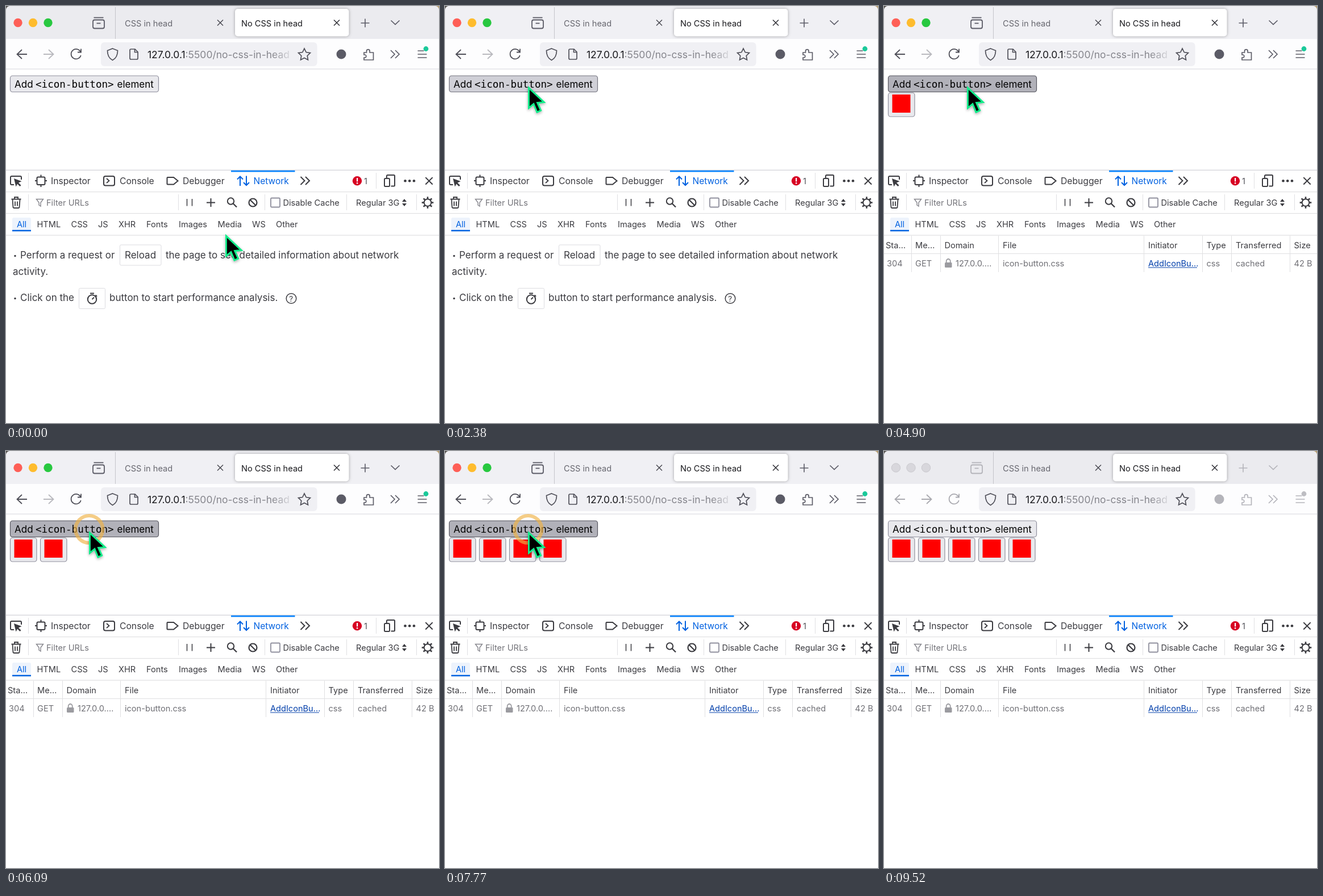
Recreate the animation shown at these times as an HTML page with a canvas. Size 762 by 735 pixels, loop 9.59 s.

```html
<!DOCTYPE html>
<html lang="en">
<head>
<meta charset="utf-8">
<title>Icon button demo</title>
<style>
html, body { margin: 0; width: 100%; height: 100%; overflow: hidden; background: #fff; }
canvas { display: block; width: 762px; height: 735px; }
</style>
</head>
<body>
<canvas id="stage" width="762" height="735"></canvas>
<script>
const ctx = document.getElementById('stage').getContext('2d');
const LOOP = 9590, STEP = 70;
const SANS = 'Inter, "Open Sans", sans-serif';
const MONO = '"DejaVu Sans Mono", monospace';
const INK = '#3b3b40', BLUE = '#0061e0', RULE = '#e0e0e2';
const CLICKS = [3010, 4900, 6020, 6790, 7700];
const SHRINK = 4130, LEAVE = 8190, BLUR = 9520;

function text(s, x, y, size = 14.6, color = INK, font = SANS) {
  ctx.font = `${size}px ${font}`;
  ctx.fillStyle = color;
  ctx.fillText(s, x, y);
}
function line(d, color = INK, width = 2) {
  ctx.strokeStyle = color;
  ctx.lineWidth = width;
  ctx.stroke(new Path2D(d));
}
function shape(d, color) {
  ctx.fillStyle = color;
  ctx.fill(new Path2D(d));
}
function rect(x, y, w, h, color) {
  ctx.fillStyle = color;
  ctx.fillRect(x, y, w, h);
}
function box(x, y, w, h, r, fill, stroke, width = 1) {
  ctx.beginPath();
  ctx.roundRect(x, y, w, h, r);
  if (fill) { ctx.fillStyle = fill; ctx.fill(); }
  if (stroke) { ctx.strokeStyle = stroke; ctx.lineWidth = width; ctx.stroke(); }
}
function disc(x, y, r, fill, stroke, width = 1) {
  ctx.beginPath();
  ctx.arc(x, y, r, 0, Math.PI * 2);
  if (fill) { ctx.fillStyle = fill; ctx.fill(); }
  if (stroke) { ctx.strokeStyle = stroke; ctx.lineWidth = width; ctx.stroke(); }
}
function cross(x, y, r, color, width) {
  line(`M${x - r} ${y - r}l${2 * r} ${2 * r}M${x + r} ${y - r}l${-2 * r} ${2 * r}`, color, width);
}
function plus(x, y, r, color, width) {
  line(`M${x - r} ${y}h${2 * r}M${x} ${y - r}v${2 * r}`, color, width);
}
function spokes(x, y, n, r1, r2, color, width) {
  for (let i = 0; i < n; i++) {
    const a = i * Math.PI * 2 / n, c = Math.cos(a), s = Math.sin(a);
    line(`M${x + r1 * c} ${y + r1 * s}L${x + r2 * c} ${y + r2 * s}`, color, width);
  }
}
function star(x, y, r) {
  let d = '';
  for (let i = 0; i < 10; i++) {
    const a = (i / 5 - .5) * Math.PI, k = i % 2 ? r * .5 : r;
    d += `${i ? 'L' : 'M'}${x + k * Math.cos(a)} ${y + k * Math.sin(a)}`;
  }
  line(d + 'Z', '#4f4f58', 1.7);
}

function browser(t) {
  const idle = t >= BLUR;
  const k = idle ? 0 : Math.min(1, t / 280);
  const icon = idle ? '#b4b4ba' : '#5b5b66';
  rect(0, 0, 762, 58, `rgb(${235 + 5 * k},${235 + 5 * k},${239 + 5 * k})`);
  shape('M0 0h6q-5 1-6 6z', '#55534f');
  shape('M762 0h-6q5 1 6 6z', '#b79f72');
  ['#fe5f57', '#febc2e', '#28c840'].forEach((c, i) =>
    disc(21 + 26.5 * i, 29.5, 7.7, idle ? '#d8d7dc' : c, idle ? '#c9c8cd' : null));
  line('M154.5 20.5h17', icon, 1.8);
  box(153, 24.5, 20, 15, 3, null, icon, 1.8);
  line('M159.5 30.5h7', icon, 1.8);
  rect(192, 2, 1, 56, '#c4c4ca');
  text('CSS in head', 209, 35.5, 14.6, '#66666e');
  cross(377, 29.5, 5, '#4a4a52', 1.5);

  ctx.save();
  ctx.shadowColor = 'rgba(0,0,0,.35)';
  ctx.shadowBlur = 5;
  box(403, 5, 200.5, 48.5, 5, '#fff');
  ctx.restore();
  text('No CSS in head', 414, 35.5, 14.6, '#18181c');
  cross(582, 29.5, 5, '#303036', 1.5);
  plus(632, 30, 7.5, icon, 1.6);
  line('M677.5 25.5l7.5 7 7.5-7', icon, 1.7);

  rect(0, 58, 762, 53, '#fdfdfe');
  rect(0, 110.5, 762, 1.2, '#dedee3');
  const dark = idle ? '#aaaab0' : '#4f4f58';
  line('M37 85H20M28 77l-8.5 8 8.5 8', dark, 1.8);
  line('M66 85h17M75 77l8.5 8-8.5 8', idle ? '#aaaab0' : '#b9b9be', 1.8);
  line('M131.2 81a8.7 8.7 0 1 0 .5 6M132 75.5v6h-6', dark, 1.8);
  box(167, 64, 380.5, 42, 6, '#f0f0f4');
  line('M187.5 75l9 3.5c0 9-3 14-9 17c-6-3-9-8-9-17z', '#4f4f58', 1.7);
  line('M220 76h7l5 5v11q0 2-2 2h-10q-2 0-2-2v-14q0-2 2-2zM226.5 76.5v5h5', '#4f4f58', 1.7);

  const fade = ctx.createLinearGradient(468, 0, 508, 0);
  fade.addColorStop(0, '#85858c');
  fade.addColorStop(1, 'rgba(133,133,140,0)');
  text('127.0.0.1', 249, 92, 17.5, '#18181c');
  const host = ctx.measureText('127.0.0.1').width;
  text(':5500/no-css-in-head', 249 + host, 92, 17.5, fade);
  star(525, 86, 11);

  disc(590, 85, 8.5, icon);
  line('M630 82h4.5v-2.5a2.8 2.8 0 0 1 5.6 0v2.5h6.4v13h-16.5v-4h2a2.6 2.6 0 0 0 0-5h-2z', icon, 1.7);
  line('M677 78l7 7-7 7M685 78l7 7-7 7', icon, 1.7);
  line('M724.5 79h11M724.5 85h16M724.5 91h16', icon, 1.6);
  disc(739, 75.5, 4.4, idle ? '#bdbdc2' : '#1bc99a');
}

function tools() {
  rect(0, 289, 762, 446, '#fff');
  rect(0, 288.7, 762, 1.3, '#d5d5d9');
  for (const y of [327, 365, 403.5]) rect(0, y, 762, 1.2, RULE);
  for (const [x, y] of [[39, 294], [651, 294], [39, 332], [303, 332], [455, 332], [599, 332], [722, 332]])
    rect(x, y, 1, 28, RULE);

  line('M14 315h-4q-2 0-2-2v-11q0-2 2-2h15q2 0 2 2v4', INK, 2);
  shape('M14 304l13.5 5-5.5 2.5 4.5 4.5-2 2-4.5-4.5-2.5 5z', INK);
  box(54.5, 301.5, 14, 13.5, 2, null, INK, 2);
  line('M61.5 297.5v4M61.5 315v4M51 308h4M68 308h4', INK, 2);
  text('Inspector', 79, 314, 15.7);
  box(172, 300, 19, 16.5, 3, null, INK, 2);
  line('M177 304l4.5 4-4.5 4', INK, 1.8);
  text('Console', 200, 314, 15.7);
  line('M284.5 302h10.5l7.5 6.2-7.5 6.2h-10.5q-1 0-1-1v-10.4q0-1 1-1z', INK, 2);
  text('Debugger', 311, 314, 15.7);
  rect(396, 289.8, 112.5, 2.7, '#0a84ff');
  line('M412 317v-16M407 305.5l5-5 5 5M423 299.5v16M418 311l5 5 5-5', BLUE, 2);
  text('Network', 435.5, 314, 15.5, BLUE);
  line('M518.5 301l7 7-7 7M527 301l7 7-7 7', INK, 2);
  disc(618, 308.3, 8.2, '#d70022');
  rect(617, 303, 2.2, 6.5, '#fff');
  disc(618.1, 312.2, 1.3, '#fff');
  text('1', 630, 313.5, 14.6, '#55555c');
  line('M670 304v-4.5q0-1.5 1.5-1.5h11q1.5 0 1.5 1.5v16.500q0 1.500-1.5 1.500h-5', INK, 2);
  box(666, 304, 9, 14, 1.5, null, INK, 2);
  for (const x of [702.5, 710.2, 718]) disc(x, 308.3, 2.3, INK);
  cross(744.5, 308.3, 6.2, INK, 2);

  line('M9.5 340.5h17M15 340v-3h6v3M11.5 341l1 13.500q0 1.500 2 1.500h7q2 0 2-1.500l1-13.500M16 344.500v8M20 344.500v8', INK, 1.8);
  line('M53.500 340.500h12l-4.500 6v6.500l-3-2v-4.500z', '#85858c', 1.4);
  text('Filter URLs', 71, 351.700, 14.6, '#737379');
  line('M318.500 340v12.500M327.500 340v12.500', INK, 1.5);
  plus(360.500, 346.500, 7.500, INK, 2);
  disc(395.500, 344, 5.700, null, INK, 2);
  line('M399.500 348l6.500 6.500', INK, 2.3);
  disc(434.500, 346.500, 7, null, INK, 2.2);
  line('M429.500 341.500l10 10', INK, 2.2);
  box(466, 338.500, 16, 16, 1.5, '#fff', '#8f8f9d', 1.8);
  text('Disable Cache', 487.5, 351.7);
  text('Regular 3G', 616, 351.7);
  shape('M697 345l4-5 4 5zM697 348l4 5 4-5z', INK);
  disc(742, 346.500, 6.300, null, INK, 2);
  spokes(742, 346.500, 8, 6.500, 10.300, INK, 2.6);

  box(11, 373, 33, 24, 3, '#edf3fc');
  rect(11, 394.7, 33, 2.5, BLUE);
  text('All', 19, 390, 14.6, BLUE);
  [['HTML', 54.5], ['CSS', 114.5], ['JS', 162], ['XHR', 198], ['Fonts', 247],
   ['Images', 304], ['Media', 372.5], ['WS', 433], ['Other', 475]]
    .forEach(([s, x]) => text(s, x, 390));
}

function hints() {
  disc(16, 440.5, 1.7, INK);
  text('Perform a request or', 25, 445, 17);
  box(200.5, 421, 72.5, 36, 2, '#fff', '#dcdce0');
  text('Reload', 209, 445, 17);
  text('the page to see detailed information about network', 281, 445, 17);
  text('activity.', 12, 474, 17);
  disc(16, 515.5, 1.7, INK);
  text('Click on the', 25, 520, 17);
  box(128.5, 497.5, 46, 36, 2, '#fff', '#dcdce0');
  disc(151.5, 517, 7.700, null, INK, 2);
  line('M148 506.500h7M151.500 517l3.500-3.500M157.500 509.500l2.500 2.500', INK, 2);
  text('button to start performance analysis.', 182, 520, 17);
  disc(502, 515.5, 8.8, null, INK, 1.5);
  text('?', 498.3, 520.5, 13.5);
}

function table() {
  const gray = '#6f6f75';
  rect(0, 436, 762, 1, RULE);
  for (const x of [48, 99, 201, 457, 560, 611, 714]) rect(x, 405, 1, 64, RULE);
  const cols = [['Sta…', 3, '304', 5], ['Me…', 55, 'GET', 55], ['Domain', 106.5, '127.0.0.…', 126],
    ['File', 209, 'icon-button.css', 209], ['Initiator', 465, 'AddIconBu…', 465], ['Type', 567.5, 'css', 567.5],
    ['Transferred', 619, 'cached', 619], ['Size', 721.5, '42 B', 721.5]];
  cols.forEach(([head, x, cell, cx], i) => {
    text(head, x, 427);
    text(cell, cx, 459, 14.6, i === 4 ? '#003eaa' : gray);
  });
  rect(465, 460.5, 86, 1, '#003eaa');
  box(107, 452, 12.5, 9, 1.5, '#9b9ba0');
  line('M109.700 452v-2.500a3.500 3.500 0 0 1 7 0v2.500', '#9b9ba0', 1.8);
}

// Tip of the pointer
function pointer(t) {
  if (t < LEAVE) {
    const u = Math.min(1, Math.max(0, (t - 980) / 980));
    const s = 1 - (1 - u) ** 2.5, r = 1 - s;
    const bend = (a, c, b) => r * r * a + 2 * r * s * c + s * s * b;
    return [bend(386, 204, 146), bend(402, 305, 141)];
  }
  const u = (t - LEAVE) / 140;
  return [146 - 7 * Math.min(u, 2.5), 141 + 24 * u ** 3.27];
}

function arrow([x, y]) {
  if (y > 740) return;
  ctx.save();
  ctx.translate(x, y);
  const d = 'M1.500 3.500V38.500L10 31.500L16 46L22.500 43L16.500 29.500L28 28.500Z';
  ctx.shadowColor = 'rgba(0,0,0,.4)';
  ctx.shadowBlur = 5;
  ctx.shadowOffsetY = 2;
  line(d, '#12ee8b', 3);
  ctx.restore();
  ctx.save();
  ctx.translate(x, y);
  shape(d, '#000');
  line(d, '#12ee8b', 2.8);
  ctx.restore();
}

function button(x, y, w, h, state) {
  box(x + .5, y + .5, w - 1, h - 1, 4,
    ['#e9e9ed', '#d0d0d7', '#b1b1b9'][state], ['#8f8f9d', '#74747f', '#55555e'][state], 1.2);
}

function page(t, [px, py]) {
  const over = (x, y, w, h) => px >= x && px < x + w && py >= y && py < y + h;
  const pressed = CLICKS.some(c => t >= c && t < c + 140);
  const count = CLICKS.filter(c => t >= c + 140).length;
  const big = count > 0 && t < SHRINK;
  ctx.save();
  ctx.beginPath();
  ctx.rect(0, 112, 762, 176.7);
  ctx.clip();
  button(7, 122.5, 262, 29.5, pressed ? 2 : over(7, 123, 262, 29) ? 1 : 0);
  text('Add', 15, 143.5, 17, '#000');
  text('<icon-button>', 52, 143.5, 17.6, '#000', MONO);
  text('element', 195.5, 143.5, 17, '#000');
  if (big) {
    button(7, 152.5, 412, 412, 0);
    rect(14.5, 156, 397.5, 400, '#f00');
    rect(745, 112, 17, 177, '#fafafa');
    rect(745, 112, 1, 177, '#e4e4e4');
    box(750, 113, 10.5, 110, 5, '#c1c1c1');
  } else {
    for (let i = 0; i < count; i++) {
      const x = 7 + 53 * i;
      button(x, 152.5, 47.5, 43, over(x, 152.5, 47, 43) ? 1 : 0);
      rect(x + 7.5, 156, 32, 32, '#f00');
    }
  }
  ctx.restore();
}

function ring(t) {
  const start = CLICKS.find(c => t >= c + 70 && t < c + 280);
  if (!start) return;
  const n = (t - start) / 70;
  const r = 17 + 10 * n - .5 * n * (n - 1) * (n < 2 ? 0 : 1) - (n > 2 ? 3 - .5 * 4 : 2) + (n >= 2 ? 0 : 0);
  const grow = n <= 2 ? 24 + 9 * (n - 1) : Math.min(r, 33 + 8 * (n - 2));
  disc(146.3, 138, grow, null, `rgba(240,178,70,${.78 - .13 * n})`, Math.max(1.3, 8.6 - 2.4 * n));
}

function draw(now) {
  const t = Math.floor((now % LOOP) / STEP) * STEP;
  const tip = pointer(t);
  rect(0, 0, 762, 735, '#fff');
  browser(t);
  page(t, tip);
  tools();
  if (t >= CLICKS[0] + 140) table();
  else hints();
  ring(t);
  arrow(tip);
}

let begin = null;
function tick(now) {
  if (begin === null) begin = now;
  draw(now - begin);
  requestAnimationFrame(tick);
}
draw(0);
requestAnimationFrame(tick);
</script>
</body>
</html>
```
